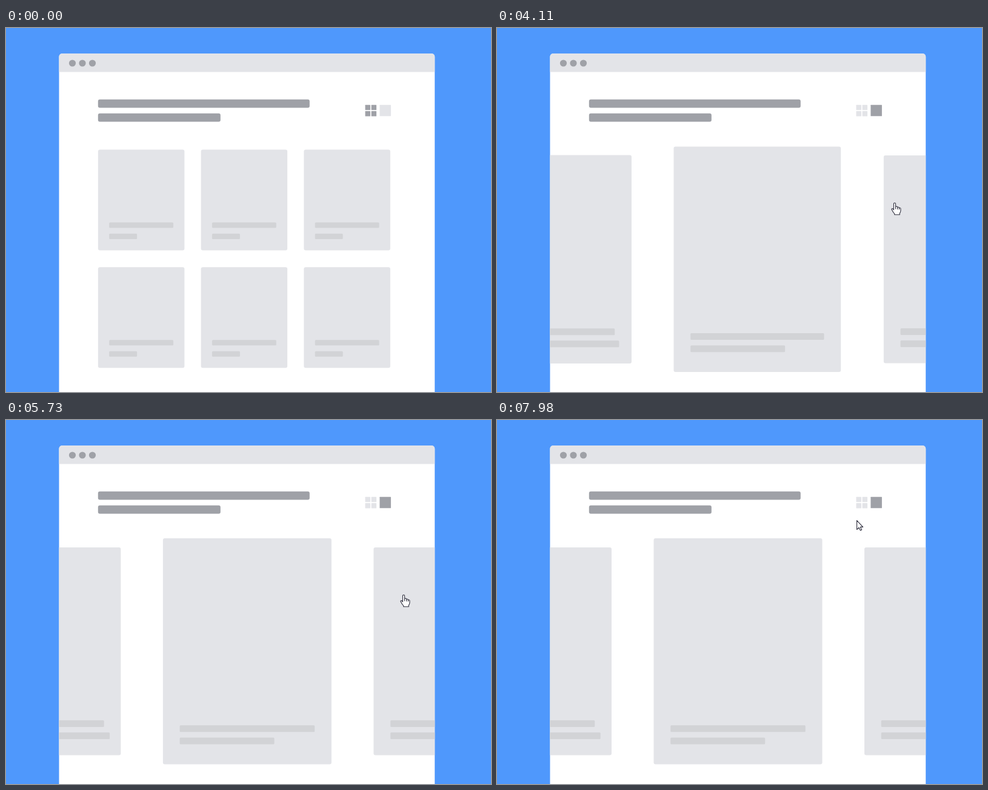
An HTML page with a canvas that plays this animation: 800x600 px, repeating every 8000 ms.

```html
<!DOCTYPE html>
<html lang="en">
<head>
<meta charset="utf-8">
<title>Grid to carousel</title>
<style>
  html, body { margin: 0; height: 100%; overflow: hidden; background: #4f98fc; }
  canvas { display: block; }
</style>
</head>
<body>
<canvas width="800" height="600"></canvas>
<script>
const ctx = document.querySelector('canvas').getContext('2d');
const BLUE = '#4f98fc', LIGHT = '#e3e4e8', MID = '#d2d3d6', DARK = '#9fa1a7';
const LOOP = 8000, TOGGLE = 2310, MORPH = 2505;
const FORWARD = [3942, 4542, 5232, 5772, 6312], BACK = 7362;

const ARROW = new Path2D('M.5 .8V15.8L3.9 12.6L6.3 17.4L8.6 16.3L6.3 11.7H10.6Z');
const HAND = new Path2D('M-1.6 11.5V1.6Q-1.6 0 0 0Q1.5 0 1.5 1.6V6.6Q2.2 5.4 3.6 5.8Q4.6 6.1 4.6 7.3' +
  'Q6.9 6.2 7.4 8.3Q9.8 7.6 9.9 9.8V13.2Q9.6 15.6 8.2 17V19.4H-.3V17.8' +
  'Q-2.5 15.8-3.6 13.2L-5 10.8Q-5.3 9.3-3.9 9.3Q-2.7 9.5-1.6 11.5Z');
const KNUCKLES = new Path2D('M1.5 6.6V10.2M4.6 7.3V10.6M7.4 8.3V11');

const lerp = (a, b, p) => a + (b - a) * p;
const clamp = p => Math.min(1, Math.max(0, p));
const smooth = p => p * p * (3 - 2 * p);
const outCubic = p => 1 - (1 - p) ** 3;
const outExpo = p => p <= 0 ? 0 : p >= 1 ? 1 : 1 - 2 ** (-10 * p);
const span = (t, start, length) => clamp((t - start) / length);

// Each move follows a quadratic curve: from, control, to.
const MOVES = [
  { start: 740, length: 320, ease: outCubic, path: [[785, 268], [734, 260], [683, 252.5]] },
  { start: 1375, length: 735, ease: smooth, path: [[683, 252.5], [556, 252], [627.5, 137.5]] },
  { start: 3110, length: 320, ease: smooth, path: [[627.5, 137.5], [642, 213], [656, 288.3]] },
  { start: 6562, length: 652, ease: outCubic, path: [[656, 288.3], [300, 448], [167, 360.5]] },
  { start: 7632, length: 650, ease: outCubic, path: [[167, 360.5], [585, 266], [600, 140]] }
];

function box(x, y, w, h, color, r = 0) {
  ctx.fillStyle = color;
  ctx.beginPath();
  ctx.roundRect(x, y, w, h, r);
  ctx.fill();
}

function drawCard(i, position, morph) {
  const focus = smooth(clamp(1 - Math.abs(i - position)));
  const mix = (grid, side, center) => lerp(grid, lerp(side, center, focus), morph);
  const w = mix(142.5, 202, 278), h = mix(166, 342.5, 372.5);
  const cx = lerp(223.1 + i % 3 * 169.75, 397.5 + 309.5 * (i - position), morph);
  const cy = lerp(283.5 + Math.floor(i / 3) * 193.7, 381.3, morph);
  const x = cx - w / 2, y = cy - h / 2, bottom = y + h;
  const inset = lerp(18.3, 27.7, morph), lineHeight = lerp(9, 11, morph);
  box(x, y, w, h, LIGHT, 3);
  box(x + inset, bottom - mix(46, 57.5, 64.3), w - 2 * inset, lineHeight, MID, 1.5);
  box(x + inset, bottom - mix(27.5, 37.5, 44), lerp(46, 156, morph), lineHeight, MID, 1.5);
}

function drawPage(t) {
  box(0, 0, 800, 600, BLUE);
  box(87.5, 42.3, 619.7, 570, '#fff', 5);
  box(87.5, 42.3, 619.7, 30.2, LIGHT, [5, 5, 0, 0]);
  for (const x of [109.5, 126, 142.5]) box(x - 5.6, 52.4, 11.2, 11.2, DARK, 5.6);
  box(151.8, 117.8, 349, 13.7, DARK, 3);
  box(151.8, 140.7, 202, 13.7, DARK, 3);

  const single = t >= TOGGLE;
  for (const x of [592.5, 602.6])
    for (const y of [126.8, 137]) box(x, y, 8.4, 8.4, single ? LIGHT : DARK, .5);
  box(616.4, 126.8, 18.5, 18.5, single ? DARK : LIGHT, .5);
}

function drawCards(t) {
  const slide = start => outExpo(span(t, start, 515));
  const position = FORWARD.reduce((sum, start) => sum + slide(start), -slide(BACK));
  const morph = outCubic(span(t, MORPH, 385));
  ctx.save();
  ctx.beginPath();
  ctx.rect(87.5, 72, 619.7, 528);
  ctx.clip();
  for (let i = 0; i < 6; i++) drawCard(i, position, morph);
  ctx.restore();
}

function drawCursor(t) {
  const move = MOVES.filter(m => t >= m.start).pop();
  if (!move) return;
  const u = move.ease(span(t, move.start, move.length)), v = 1 - u;
  const [x, y] = [0, 1].map(k =>
    v * v * move.path[0][k] + 2 * u * v * move.path[1][k] + u * u * move.path[2][k]);
  const onIcon = x > 616 && x < 635 && y > 127 && y < 145;
  const onSideCard = t > MORPH && y > 211 && (x > 605 || x < 188);

  ctx.save();
  ctx.globalAlpha = span(t, 725, 120);
  ctx.translate(x, y);
  ctx.fillStyle = '#fff';
  ctx.strokeStyle = '#30303f';
  ctx.lineWidth = 1.1;
  ctx.lineJoin = 'round';
  const shape = onIcon || onSideCard ? HAND : ARROW;
  ctx.fill(shape);
  ctx.stroke(shape);
  if (shape === HAND) ctx.stroke(KNUCKLES);
  ctx.restore();
}

function frame() {
  const t = performance.now() % LOOP;
  drawPage(t);
  drawCards(t);
  drawCursor(t);
  requestAnimationFrame(frame);
}
frame();
</script>
</body>
</html>
```
